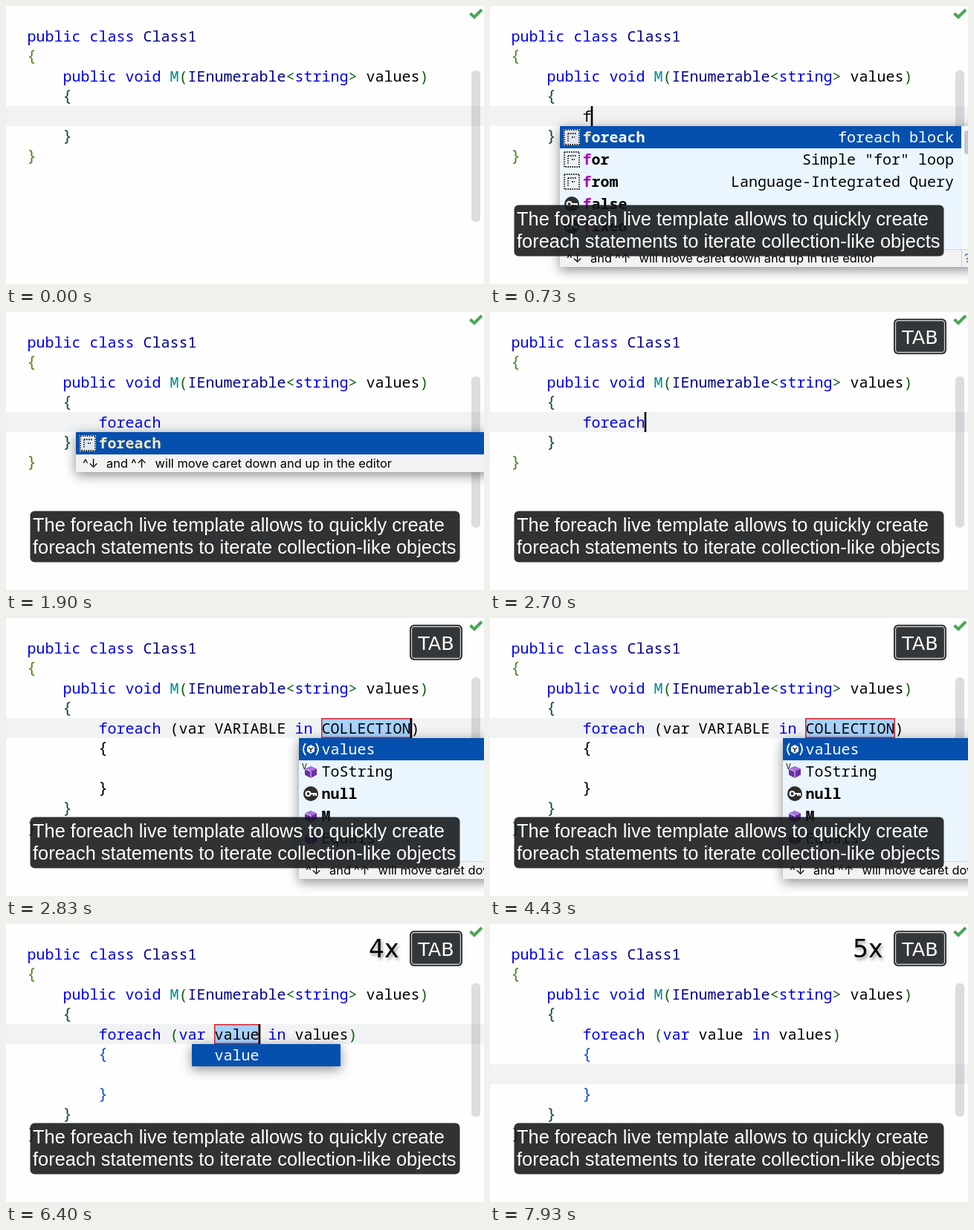
Animation, 643 px wide and 375 px high, one loop 8000 ms. Source, as an HTML page:

```html
<!DOCTYPE html>
<html lang="en">
<head>
<meta charset="utf-8">
<title>The foreach live template</title>
<style>
  html, body { margin: 0; width: 100%; height: 100%; overflow: hidden; background: #fefefe; }
  svg { display: block; width: 643px; height: 375px; }
  text { white-space: pre; }
  .code { font: 20px "Noto Sans Mono", monospace; }
  .brace { font: 500 22px "Noto Sans Mono", monospace; }
  .item { font: 500 20px "Noto Sans Mono", monospace; }
  .bold { font-weight: 700; }
  .k { fill: #0000e6; }
  .t { fill: #00008b; }
  .m { fill: #008b8b; }
  .g { fill: #0f5f0f; }
  .hit { fill: #b000b0; }
  .on .hit { fill: #fbe8b8; }
  .on { fill: #fff; }
  .hint { font: 16.4px Inter, sans-serif; }
  .note { font: 25.43px "Liberation Sans", Arial, sans-serif; fill: #fff; }
  .key { font: 25.5px "DejaVu Sans", sans-serif; fill: #fff; text-anchor: middle; }
  .count { font: 33px "DejaVu Sans", sans-serif; filter: drop-shadow(2px 3px 2px rgba(0,0,0,.4)); }
  .menu { filter: drop-shadow(0 4px 8px rgba(0,0,0,.45)); }
</style>
</head>
<body>
<svg id="stage" viewBox="0 0 643 375" xml:space="preserve"></svg>
<script>
const LOOP = 8000, WORD = 'foreach';

// Each entry changes part of the state at its time; caret is a column, 0 hides it.
const keys = [
  [0, { stage: 0, n: 0, menu: 0, caret: 0, tick: 1, tabs: 0, note: 0, parsed: 0, usage: 0 }],
  [360, { note: 1 }],
  [400, { n: 1, caret: 9 }],
  [660, { menu: 1 }],
  ...[760, 860, 950, 1040, 1130, 1220].flatMap((t, i) => [
    [t, { n: i + 2, caret: i + 10 }],
    [t + 40, { menu: i + 2 }]
  ]),
  [1900, { caret: 0 }],
  [2400, { caret: 15 }],
  [2560, { menu: 0 }],
  [2700, { tabs: 1 }],
  [2730, { stage: 1, caret: 43, tick: 0 }],
  [2790, { menu: 1 }],
  [2830, { tick: 1 }],
  [3430, { caret: 0 }],
  [3930, { caret: 43 }],
  [4430, { caret: 0 }],
  [4600, { tabs: 2, stage: 2, menu: 0, caret: 39, tick: 0 }],
  [4760, { parsed: 1 }],
  [4860, { usage: 1 }],
  [4930, { tick: 1 }],
  [5460, { tabs: 3, stage: 3, caret: 20 }],
  [5500, { menu: 1 }],
  [6260, { tabs: 4, stage: 4, menu: 0, caret: 26, usage: 0, tick: 0 }],
  [6330, { menu: 1 }],
  [6400, { tick: 1 }],
  [6900, { tabs: 5, menu: 0 }],
  [6930, { stage: 5, caret: 12, tick: 0 }],
  [7100, { tick: 1 }],
  [7930, { caret: 0 }]
];

const span = c => s => `<tspan class="${c}">${s}</tspan>`;
const [k, ty, m, g, hit] = ['k', 't', 'm', 'g', 'hit'].map(span);
const text = (x, y, s, cls = 'code', more = '') => `<text x="${x}" y="${y}" class="${cls}" ${more}>${s}</text>`;
const rect = (x, y, w, h, fill, more = '') =>
  `<rect x="${x}" y="${y}" width="${w}" height="${h}" fill="${fill}" ${more}/>`;
const path = (d, more) => `<path d="${d}" ${more}/>`;

// Editor grid: cells of 12 by 27
const cx = col => 28 + 12 * col;
const cy = row => 27 + 27 * row;
const line = (row, col, s) => text(cx(col) + .5, cy(row) + 21, s);
const brace = (row, col, s, fill) => text(cx(col), cy(row) + 20.5, s, 'brace', `fill="${fill}"`);
const mark = (row, col, len, fill) => rect(cx(col), cy(row), 12 * len, 27, fill);
const field = (row, col, len) => mark(row, col, len, '#a6d2ff') +
  rect(cx(col) + .75, cy(row) + .75, 12 * len - .5, 25.5, 'none', 'stroke="#e0202c" stroke-width="1.5"');

// Icons are drawn around their own centre.
const icons = {
  template: on => rect(-11, -11, 22, 22, on ? '#dfe6ef' : '#eef2f5') +
    path('M-10-10h20v20h-20zM-5-5h11M-5-5v11M0 0h4',
      'fill="none" stroke="#222" stroke-width="1.8" stroke-dasharray="1.6 1.4"'),
  key: () => '<circle r="10" fill="#2e2e2e"/>' +
    '<circle cx="-3.5" r="3" fill="none" stroke="#fff" stroke-width="2"/>' +
    path('M0 0h7v3M4 0v3', 'fill="none" stroke="#fff" stroke-width="2"'),
  param: () => path('M-7-8q-6 8 0 16M7-8q6 8 0 16', 'fill="none" stroke="#fff" stroke-width="1.8"') +
    path('M0-6l5 3v6l-5 3-5-3v-6z', 'fill="#fff"') +
    path('M-3-2l3 2 3-2M0 0v4', 'fill="none" stroke="#222" stroke-width="1.5"'),
  method: () => path('M0-7l8 3.5v8L0 9l-8-4.5v-8z', 'fill="#6a2fa5"') +
    path('M0-7l8 3.5L0 0l-8-3.5z', 'fill="#a873dc"') + path('M-8-3.5L0 0v9', 'fill="none" stroke="#e9dcf7"'),
  type: () => path('M-10-3l6-6 6 5-6 6z', 'fill="#c77a14"') +
    path('M0-2h8M-1 2v5h5', 'fill="none" stroke="#c77a14" stroke-width="2"') +
    path('M6-4l4 4-4 4-3-4zM5 4l4 3-4 4-4-4z', 'fill="#c77a14"')
};

const hint = (x, y) => [[9, '^↓'], [41, 'and'], [74, '^↑'], [106.5, 'will move caret down and up in the editor']]
  .map(([dx, s]) => text(x + dx, y, s, 'hint')).join('');

// Rows are [icon, label, bold, note on the right].
function menu(col, width, rows, { prefix = 0, foot = 0, bar = 0 } = {}) {
  const x = cx(col) - 30, top = 162, end = foot || top + 30 * rows.length;
  const full = width - bar;
  let out = rect(x, top, width, end - top, '#ebf5fd');
  out += rect(x, top, full, 30, '#0550ae');
  rows.forEach(([icon, label, bold, side], i) => {
    const y = top + 30 * i, on = !i;
    out += `<g class="${on ? 'on' : ''}">`;
    if (icon) out += `<g transform="translate(${x + 16} ${y + 15})">${icons[icon](on)}</g>`;
    if (icon == 'method' && label == 'ToString')
      out += text(x + 4, y + 12, 'V', 'hint', 'style="font-size:10px"');
    const shown = prefix ? hit(label.slice(0, prefix)) + label.slice(prefix) : label;
    out += text(x + 30.5, y + 22, shown, bold ? 'item bold' : 'item');
    if (side) out += text(x + 530, y + 22, side, 'item', 'text-anchor="end"');
    out += '</g>';
  });
  if (bar) out += rect(x + full, top, bar, end - top, '#f6f9fd') + rect(x + full + 4, 168, 8, 32, '#c3c7cc', 'rx="4"');
  if (foot) {
    out += rect(x, foot, width, 24, '#f2f2f2') + rect(x, foot, width, 1, '#d5d9de') + hint(x, foot + 17.5);
    if (bar) out += rect(x + full, foot, 1, 24, '#c8ccd0') + text(x + full + 4, foot + 18, '?', 'hint', 'fill="#2a70c8"');
  }
  return `<g class="menu">${out}</g>`;
}

const words = [
  ['template', 'foreach', 1, 'foreach block'],
  ['template', 'for', 1, 'Simple "for" loop'],
  ['template', 'from', 1, 'Language-Integrated Query'],
  ['key', 'false', 1],
  ['key', 'fixed', 1]
];
const members = [['param', 'values'], ['method', 'ToString'], ['key', 'null', 1], ['method', 'M', 1], ['method', 'Equals']];

function popup({ stage, menu: n }) {
  if (!n) return '';
  if (stage == 0) {
    const rows = words.filter(w => w[1].startsWith(WORD.slice(0, n)));
    if (n == 1) return menu(8, 560, rows, { prefix: 1, foot: 328, bar: 20 });
    const list = n > 3 ? [['template', 'foreach', 1]] : rows;
    return menu(8, 560, list, { prefix: n, foot: 162 + 30 * list.length });
  }
  if (stage == 1) return menu(33, 560, members, { foot: 328 });
  if (stage == 3) return menu(17, 240, [['', 'var'], ['type', 'string']]);
  return menu(21, 200, [['', 'value']]);
}

function marks({ stage, parsed, usage }) {
  let out = '';
  if (usage) out += mark(2, 38, 6, '#dfe6cb');
  if (usage && stage == 3) out += mark(4, 33, 6, '#dfe6cb');
  if (parsed && (stage == 2 || stage == 3)) out += mark(4, 16, 1, '#93d9b0') + mark(4, 39, 1, '#93d9b0');
  if (stage == 1) out += field(4, 33, 10);
  if (stage == 2) out += field(4, 33, 6);
  if (stage == 3) out += field(4, 17, 3);
  if (stage == 4) out += field(4, 21, 5);
  return out;
}

function code({ stage, n, parsed }) {
  const method = '#1c4f3f', outer = '#4e8a1e', inner = parsed ? '#0d55d8' : '#000';
  const shift = stage ? 3 : 0;
  let out = line(0, 0, k('public class ') + ty('Class1')) + brace(1, 0, '{', outer) +
    line(2, 4, k('public void ') + m('M') + g('(') + ty('IEnumerable') + g('&lt;') + k('string') + g('&gt;') + ' values' + g(')')) +
    brace(3, 4, '{', method) + brace(5 + shift, 4, '}', method) + brace(6 + shift, 0, '}', outer);
  if (!stage) {
    const typed = WORD.slice(0, n);
    return out + line(4, 8, n == 3 || n == 7 ? k(typed) : typed);
  }
  const paren = parsed ? g : s => s;
  const name = stage > 3 ? 'value' : 'VARIABLE', list = stage > 1 ? 'values' : 'COLLECTION';
  return out + brace(5, 8, '{', inner) + brace(7, 8, '}', inner) +
    line(4, 8, k('foreach ') + paren('(') + (parsed ? k('var') : 'var') + ` ${name} ` + k('in') + ` ${list}` + paren(')'));
}

function badge(tabs) {
  if (!tabs) return '';
  return rect(543, 9, 71, 48, '#2b2d2f', 'rx="6"') +
    rect(545.5, 11.5, 66, 43, '#343739', 'rx="4" stroke="#c9cbcc" stroke-width="1.3"') +
    text(578.5, 43, 'TAB', 'key') + (tabs > 1 ? text(488, 45, tabs + 'x', 'count') : '');
}

function draw(s) {
  const row = s.stage == 5 ? 6 : 4;
  const [barY, barH] = s.stage ? [80, 180] : [87, 204];
  let out = rect(0, 0, 643, 375, '#fefefe') + rect(0, cy(row), 643, 27, '#f1f2f4');
  out += marks(s) + code(s);
  if (s.caret) out += rect(cx(s.caret) - .3, cy(row), 2.6, 27, '#000');
  out += rect(626, barY, 12, barH, 'rgba(0,0,0,.13)', 'rx="5"');
  if (s.usage) out += rect(622, 116, 21, 3, '#929bab') + rect(622, 142, 21, 3, '#929bab');
  if (s.tick) out += path('M624.5 10l5.5 5L640 5', 'fill="none" stroke="#4aa657" stroke-width="4"');
  out += popup(s) + badge(s.tabs);
  if (s.note) out += rect(32.5, 268.5, 578, 69, 'rgba(20,22,24,.88)', 'rx="6"') +
    text(36, 295.5, 'The foreach live template allows to quickly create', 'note') +
    text(36, 325.5, 'foreach statements to iterate collection-like objects', 'note');
  stage.innerHTML = out;
}

const stage = document.getElementById('stage');
const start = performance.now();
let last = 0;

function tick() {
  const t = (performance.now() - start) % LOOP;
  const past = keys.filter(([at]) => at <= t);
  if (past.length != last) {
    last = past.length;
    draw(Object.assign({}, ...past.map(([, change]) => change)));
  }
  requestAnimationFrame(tick);
}
tick();
</script>
</body>
</html>
```
